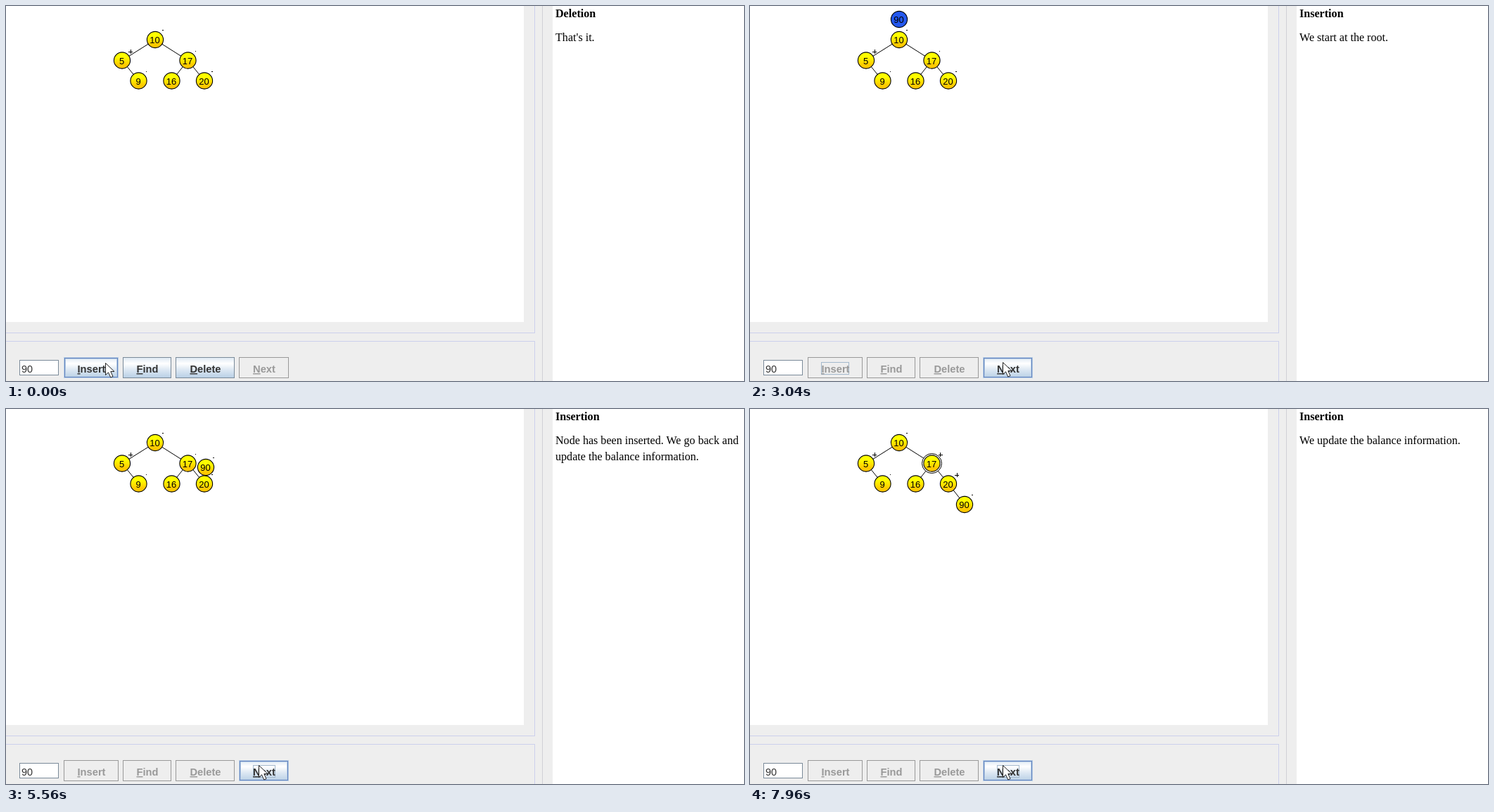
Write an HTML page that moves like this. It is 1049 px wide and 534 px high and loops after 8000 ms.

```html
<!DOCTYPE html>
<html lang="en">
<head>
<meta charset="utf-8">
<title>Search tree insertion</title>
<style>
  html, body { margin: 0; width: 100%; height: 100%; overflow: hidden; background: #eee; }
  svg { display: block; width: 100%; height: 100%; }
  .sans { font-family: "Liberation Sans", Arial, sans-serif; }
  .label { font-size: 13px; text-anchor: middle; }
  .caption { font-size: 14.7px; font-weight: bold; text-anchor: middle; }
  .mnemonic { text-decoration: underline; }
  .note { font: 16.1px "Liberation Serif", "Times New Roman", serif; }
  .crisp { shape-rendering: crispEdges; }
</style>
</head>
<body>
<svg id="stage" viewBox="0 0 1049 534">
  <defs>
    <linearGradient id="gold" x2="0" y2="1">
      <stop offset=".25" stop-color="#ff0"/><stop offset=".8" stop-color="#ffc800"/>
    </linearGradient>
    <linearGradient id="ocean" x2="0" y2="1">
      <stop stop-color="#dde8f3"/><stop offset=".3" stop-color="#fff"/>
      <stop offset=".6" stop-color="#dde8f3"/><stop offset="1" stop-color="#b8cfe5"/>
    </linearGradient>
  </defs>
  <rect width="1049" height="534" fill="#eee"/>
  <rect width="736" height="450" fill="#fff"/>
  <rect x="777" width="272" height="534" fill="#fff"/>
  <path class="crisp" d="M0 465.5H751.5V0M0 477.5H751.5V534" fill="none" stroke="#ccd0ec"/>
  <path class="crisp" d="M762.5 0V534" stroke="#d0d0d6"/>
  <g id="edges" stroke="#000"></g>
  <g id="nodes"></g>
  <g class="note">
    <text id="title" x="781" y="16" font-weight="bold"></text>
    <text id="line1" x="781" y="50"></text>
    <text id="line2" x="781" y="73"></text>
  </g>
  <rect class="crisp" x="19.5" y="504.5" width="55" height="21" fill="#fff" stroke="#7a8a99"/>
  <text class="sans" x="22" y="521.5" font-size="14.4" fill="#333">90</text>
  <g id="buttons"></g>
  <path id="cursor" d="M.5 .5V17.5L4.5 13.8L7.8 21L11 19.6L7.8 12.5H13Z" fill="#fff" stroke="#222"/>
</svg>
<script>
const LOOP = 8000, STEP = 50, STEPS = 10;
const PRESS = 120;
const INSERT_DOWN = 1140, INSERT_UP = 1390;
const CLICKS = [3230, 4370, 5500, 6600, 7620];
const NS = "http://www.w3.org/2000/svg";
const $ = id => document.getElementById(id);

function add(parent, tag, attrs = {}, text) {
  const el = document.createElementNS(NS, tag);
  set(el, attrs);
  if (text) el.textContent = text;
  return parent.appendChild(el);
}
function set(el, attrs) {
  for (const key in attrs) el.setAttribute(key, attrs[key]);
}
const show = (el, on) => set(el, { visibility: on ? "visible" : "hidden" });

const PLACES = { 10: [212, 48], 5: [165, 77.5], 17: [258.5, 77.5], 9: [188.5, 106.5], 16: [235.5, 106.5], 20: [282, 106.5] };
const LEAF = [305.5, 136];

function makeNode(key, [x, y]) {
  const g = add($("nodes"), "g", { transform: `translate(${x} ${y})` });
  const ring = add(g, "circle", { r: 14, fill: "#fff", stroke: "#000" });
  const disc = add(g, "circle", { r: 11.6, fill: "url(#gold)", stroke: "#000", "stroke-width": 1.1 });
  add(g, "text", { y: 5, x: -.5, class: "sans label" }, String(key));
  const sign = add(g, "path", { class: "crisp", stroke: "#000", fill: "none" });
  show(ring, false);
  return { g, ring, disc, sign };
}
function setSign(node, sign) {
  set(node.sign, { d: { "+": "M9 -12.5H15M12 -15.5V-9.5", ".": "M10 -13.5H11.5", "": "" }[sign] });
}
function makeEdge([x1, y1], [x2, y2]) {
  return add($("edges"), "line", { x1, y1, x2, y2 });
}

for (const [a, b] of [[10, 5], [10, 17], [5, 9], [17, 16], [17, 20]]) makeEdge(PLACES[a], PLACES[b]);
const newEdge = makeEdge(PLACES[20], LEAF);
const nodes = {};
for (const key in PLACES) nodes[key] = makeNode(key, PLACES[key]);
const added = makeNode(90, LEAF);
for (const key of [10, 9, 20, 17]) setSign(nodes[key], ".");
setSign(nodes[5], "+");

function makeButton(name, x, width) {
  const g = add($("buttons"), "g");
  const mid = x + width / 2;
  const frame = inset => add(g, "rect", {
    x: x + inset + .5, y: 501 + inset - .5, width: width - 1 - 2 * inset, height: 29 - 2 * inset,
    fill: "none", class: "crisp"
  });
  const [face, middle, inner] = [0, 1, 2].map(frame);
  const focus = add(g, "rect", {
    x: Math.round(mid - 20) + .5, y: 507.5, width: 39, height: 17,
    fill: "none", stroke: "#a3b8cc", class: "crisp"
  });
  if (name === "Next") set(focus, { x: 351.5, width: 31 });
  const text = add(g, "text", { x: mid + .5, y: 522, class: "sans caption" });
  add(text, "tspan", { class: "mnemonic" }, name[0]);
  add(text, "tspan", {}, name.slice(1));
  return ({ enabled, hover, pressed, focused }) => {
    const lit = enabled && hover && !pressed;
    set(face, {
      fill: !enabled ? "#eee" : pressed ? "#b8cfe5" : "url(#ocean)",
      stroke: !enabled ? "#999" : lit ? "#b8cfe5" : "#7a8a99"
    });
    set(middle, { stroke: lit ? "#6382bf" : "#7a8a99" });
    set(inner, { stroke: "#b8cfe5" });
    show(middle, lit || pressed);
    show(inner, lit);
    set(text, { fill: enabled ? "#333" : "#999" });
    show(focus, focused);
  };
}
const insert = makeButton("Insert", 82, 78);
const find = makeButton("Find", 166, 69);
const del = makeButton("Delete", 241, 84);
const next = makeButton("Next", 331, 71);

const MOVES = [
  [INSERT_UP, [0, 0], [212, 19]],
  [CLICKS[0], [212, 19], [259, 48]],
  [CLICKS[1], [259, 48], [282, 77.5]],
  [CLICKS[2], [282, 77.5], LEAF]
];
const NOTES = [
  [0, "Deletion", "That's it."],
  [INSERT_UP, "Insertion", "We start at the root."],
  [CLICKS[0], "Insertion", "Since 90 > 10, we insert it in the right", "subtree."],
  [CLICKS[1], "Insertion", "Since 90 > 17, we insert it in the right", "subtree."],
  [CLICKS[2], "Insertion", "Node has been inserted. We go back and", "update the balance information."],
  [CLICKS[3], "Insertion", "We update the balance information."]
];
const POINTER = [[0, 141, 508], [1640, 141, 508], [2120, 342, 503], [2240, 342, 503], [2440, 359, 507], [LOOP, 359, 507]];

const latest = (list, t) => list.filter(item => t >= item[0]).pop();
const mix = (a, b, k) => a + (b - a) * k;

function pointerAt(t) {
  const i = POINTER.findIndex(p => p[0] > t);
  const [t0, x0, y0] = POINTER[i - 1], [t1, x1, y1] = POINTER[i];
  const k = (t - t0) / (t1 - t0), ease = k * k * (3 - 2 * k);
  return [Math.round(mix(x0, x1, ease)), Math.round(mix(y0, y1, ease))];
}

function render(t) {
  const [px, py] = pointerAt(t);
  set($("cursor"), { transform: `translate(${px} ${py})` });

  const [, title, line1, line2 = ""] = latest(NOTES, t);
  $("title").textContent = title;
  $("line1").textContent = line1;
  $("line2").textContent = line2;

  const running = t >= INSERT_UP;
  const firstPress = CLICKS[0] - PRESS;
  insert({
    enabled: !running, hover: px < 160,
    pressed: t >= INSERT_DOWN && !running, focused: t >= INSERT_DOWN && t < firstPress
  });
  find({ enabled: !running });
  del({ enabled: !running });
  next({
    enabled: running, hover: px >= 331,
    pressed: CLICKS.some(c => t >= c - PRESS && t < c), focused: t >= firstPress
  });

  const move = latest(MOVES, t);
  added.g.style.display = move ? "" : "none";
  if (move) {
    const [start, from, to] = move;
    const k = Math.min(1, Math.floor((t - start) / STEP) / STEPS);
    const [x, y] = [0, 1].map(axis => Math.floor(mix(from[axis], to[axis], k)));
    set(added.g, { transform: `translate(${x} ${y})` });
    set(newEdge, { x2: x, y2: y });
  }
  const linked = t >= CLICKS[2];
  show(newEdge, linked);
  set(added.disc, { fill: linked ? "url(#gold)" : "#2458ee" });
  setSign(added, linked ? "." : "");

  const at20 = t >= CLICKS[3], at17 = t >= CLICKS[4];
  show(nodes[20].ring, at20 && !at17);
  show(nodes[17].ring, at17);
  setSign(nodes[20], at20 ? "+" : ".");
  setSign(nodes[17], at17 ? "+" : ".");
}

const begin = performance.now();
function tick() {
  render((performance.now() - begin) % LOOP);
  requestAnimationFrame(tick);
}
tick();
</script>
</body>
</html>
```
